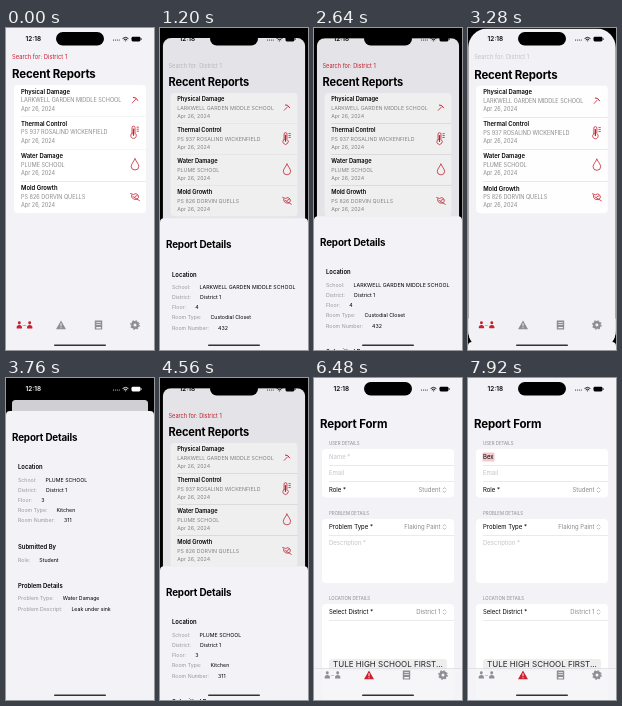
Animation of 148x322 px, one loop 8000 ms. Source, as an HTML page with a canvas:

```html
<!DOCTYPE html>
<html lang="en">
<head>
<meta charset="utf-8">
<title>Reports</title>
<style>
html, body { margin: 0; width: 148px; height: 322px; overflow: hidden; background: #000; }
canvas { display: block; width: 148px; height: 322px; }
</style>
</head>
<body>
<canvas></canvas>
<script>
const W = 148, H = 322, LOOP = 8000;
const BG = '#f2f2f7', RED = '#cc1f2f', GRAY = '#8a8a8e', PALE = '#c4c4c7', LINE = '#d6d6d9';
const canvas = document.querySelector('canvas');
const c = canvas.getContext('2d');
const ratio = window.devicePixelRatio || 1;
canvas.width = W * ratio;
canvas.height = H * ratio;

const reports = [
  ['Physical Damage', 'LARKWELL GARDEN MIDDLE SCHOOL'],
  ['Thermal Control', 'PS 937 ROSALIND WICKENFIELD'],
  ['Water Damage', 'PLUME SCHOOL'],
  ['Mold Growth', 'PS 826 DORVIN QUELLS']
];

const sheets = [
  { open: 1105, close: 2470, report: 0, floor: '4', room: 'Custodial Closet', number: '432', role: 'Parent', note: 'Door frame broken' },
  { open: 3265, close: 4390, report: 2, floor: '3', room: 'Kitchen', number: '311', role: 'Student', note: 'Leak under sink' }
];

function text(s, x, y, size, color = '#000', weight = 400, align = 'left', spacing = 0) {
  c.font = `${weight} ${size}px Inter, sans-serif`;
  c.letterSpacing = spacing + 'px';
  c.textAlign = align;
  c.textBaseline = 'middle';
  c.fillStyle = color;
  c.fillText(s, x, y);
  return c.measureText(s).width;
}

const title = (s, y, size) => text(s, 6, y, size, '#000', 700, 'left', -0.015 * size);

function box(x, y, w, h, r, color) {
  c.fillStyle = color;
  c.beginPath();
  c.roundRect(x, y, w, h, r);
  c.fill();
}

function stroke(d, x, y, color, width = 0.8) {
  c.save();
  c.translate(x, y);
  c.strokeStyle = color;
  c.lineWidth = width;
  c.lineCap = c.lineJoin = 'round';
  c.stroke(new Path2D(d));
  c.restore();
}

function fill(d, x, y, color) {
  c.save();
  c.translate(x, y);
  c.fillStyle = color;
  c.fill(new Path2D(d), 'evenodd');
  c.restore();
}

const rule = y => box(15, y, 125, 0.4, 0, LINE);

const icons = [
  y => {
    stroke('M-2.8 3L.6-.6', 129, y, RED, 0.8);
    stroke('M-1.6-2.6Q1-3.2 2.8 .4', 129, y, RED, 1);
  },
  y => {
    stroke('M-1.5 1V-4.5a1.5 1.5 0 0 1 3 0V1a2.8 2.8 0 1 1-3 0ZM3.5-5H5M3.5-3H5M3.5-1H5', 127.5, y, RED);
    stroke('M0-3V3', 127.5, y, RED, 1.3);
  },
  y => stroke('M0-5.5C1.5-2.5 3.8-.2 3.8 2A3.8 3.6 0 0 1-3.8 2C-3.8-.2-1.5-2.5 0-5.5Z', 129, y, RED),
  y => stroke('M-4.5-3Q-1-1 1-3Q4-2 3.5 1Q2 4-1.5 2.5Q-4 1-3.5-1.5M-2 0L4.5 4M0 0L2-1', 129, y, RED)
];

function tabBar(active) {
  box(0, 290.5, W, H - 290.5, 0, active ? 'rgba(245,245,248,.86)' : BG);
  if (active) box(0, 290.5, W, 0.4, 0, '#d0d0d3');
  const color = i => i === active ? RED : '#8e8e93';
  for (const x of [13.3, 23.7]) {
    box(x - 1.4, 293.2, 2.8, 3.2, 1.4, color(0));
    box(x - 2.7, 297, 5.4, 3.4, [2.7, 2.7, 0.5, 0.5], color(0));
  }
  for (const x of [16.7, 18, 19.3]) box(x, 297, 0.9, 0.9, 0.45, color(0));
  fill('M0-4.5L5 4.2H-5ZM-.5-1.8V1.3H.5V-1.8ZM-.5 2.2V3.2H.5V2.2Z', 55, 297, color(1));
  fill('M-3.7-4.5H3.7V4.5H-3.7ZM-2.2-3V-2.2H2.4V-3ZM-2.2-1V-.2H2.4V-1ZM-2.2 2V3.4H2.4V2Z', 92.5, 297, color(2));
  c.strokeStyle = color(3);
  c.lineWidth = 2.4;
  c.beginPath();
  c.arc(129, 297, 2.7, 0, 7);
  c.stroke();
  c.lineWidth = 1.2;
  c.setLineDash([1.6, 1.74]);
  c.beginPath();
  c.arc(129, 297, 4.25, 0, 2 * Math.PI);
  c.stroke();
  c.setLineDash([]);
}

function listPage(tint) {
  text('Search for: District 1', 6, 29, 5.8, tint);
  title('Recent Reports', 46.7, 11.5);
  box(8, 57, 132, 128, 4, '#fff');
  reports.forEach(([name, school], i) => {
    const y = 64 + i * 32.2;
    text(name, 15, y, 5.9, '#000', 600);
    text(school, 15, y + 8.6, 5.5, GRAY);
    text('Apr 26, 2024', 15, y + 17, 5.5, GRAY);
    icons[i](y + 8);
    if (i) rule(y - 7.5);
  });
  tabBar(0);
}

function picker(label, value, y) {
  text(label, 15, y, 6);
  text(value, 126.5, y, 6, GRAY, 400, 'right');
  stroke('M-1.4-1L0-2.4L1.4-1M-1.4 1L0 2.4L1.4 1', 130.5, y, GRAY, 0.6);
}

function formPage(t) {
  const heading = (s, y) => text(s, 15, y, 4.4, GRAY);
  title('Report Form', 46.7, 11.5);
  heading('USER DETAILS', 65.5);
  box(8, 71, 132, 48.5, 4, '#fff');
  const typed = 'Bex'.slice(0, Math.max(0, Math.floor((t - 7520) / 80) + 1));
  if (t >= 7760) box(14.5, 74.5, 12, 9, 0, '#f3c9cd');
  if (typed) {
    const w = text(typed, 15, 79, 6);
    if (t < 7760) box(15.3 + w, 75, 0.8, 8, 0, RED);
  } else {
    text('Name *', 15, 79, 6, PALE);
    if (t >= 6960) box(14.8, 75, 0.8, 8, 0, RED);
  }
  text('Email', 15, 95.5, 6, PALE);
  picker('Role *', 'Student', 112);
  rule(87);
  rule(103.5);

  heading('PROBLEM DETAILS', 136);
  box(8, 141, 132, 64, 4, '#fff');
  picker('Problem Type *', 'Flaking Paint', 149);
  rule(157);
  text('Description *', 15, 165, 6, PALE);

  heading('LOCATION DETAILS', 220.5);
  box(8, 226, 132, 100, 4, '#fff');
  picker('Select District *', 'District 1', 234);
  rule(242);
  box(15, 281, 118, 12, 3, '#eeeeef');
  text('TULE HIGH SCHOOL FIRST...', 74, 287, 8, '#222', 400, 'center');
  tabBar(1);
}

function detailSheet(s, top) {
  box(0, top, W, H, [4, 4, 0, 0], BG);
  c.save();
  c.translate(0, top);
  title('Report Details', 27, 9.8);
  const heading = (label, y) => text(label, 12, y, 5.9, '#000', 600);
  const row = (label, value, y) => {
    const w = text(label, 12, y, 5.25, '#98989d');
    text(value, 12 + w + 9, y, 5.25);
  };
  const [problem, school] = reports[s.report];
  heading('Location', 56.5);
  [['School:', school], ['District:', 'District 1'], ['Floor:', s.floor],
    ['Room Type:', s.room], ['Room Number:', s.number]]
    .forEach(([label, value], i) => row(label, value, 69 + i * 10.2));
  heading('Submitted By', 136.5);
  row('Role:', s.role, 149);
  heading('Problem Details', 175.5);
  row('Problem Type:', problem, 187.5);
  row('Problem Descript:', s.note, 198);
  c.restore();
}

function statusBar(color) {
  text('12:18', 27.3, 11, 6.4, color, 600, 'center');
  box(50, 4, 48, 13.5, 6.75, '#000');
  for (let i = 0; i < 4; i++) box(107 + i * 1.9, 11.5, 1, 1, 0.5, color);
  stroke('M-2.6-1Q0-3.2 2.6-1M-1.4.4Q0-.8 1.4.4M0 1.6V1.7', 119.5, 11.3, color, 0.9);
  box(125.5, 8.8, 9, 4.6, 1.4, color);
  box(134.9, 10.3, 0.7, 1.6, 0.3, color);
}

// Critically damped spring from 0 to 1.
function spring(ms, w) {
  const x = Math.max(0, ms) / 1000 * w;
  return 1 - (1 + x) * Math.exp(-x);
}

function draw(t) {
  const s = sheets[t < sheets[1].open ? 0 : 1];
  let p = spring(t - s.open, 16) - spring(t - s.close, 10.55);
  if (p < 0.005) p = 0;
  const presenting = t > s.open && t < s.close;

  c.setTransform(ratio, 0, 0, ratio, 0, 0);
  c.fillStyle = '#000';
  c.fillRect(0, 0, W, H);

  // The page shrinks into a dimmed, rounded card behind the sheet.
  c.save();
  const scale = 1 - 0.081 * p;
  c.translate(W / 2 * (1 - scale), 22 * p);
  c.scale(scale, scale);
  c.beginPath();
  c.roundRect(0, 0, W, H, p && 4 + 16 * (1 - p) ** 2);
  c.clip();
  c.fillStyle = BG;
  c.fillRect(0, 0, W, H);
  if (t >= 5920) formPage(t);
  else listPage(presenting ? PALE : RED);
  c.fillStyle = `rgba(0,0,0,${0.14 * p})`;
  c.fillRect(0, 0, W, H);
  c.restore();

  if (p) detailSheet(s, H - 290 * p);
  statusBar(p > 0.5 ? '#fff' : '#000');
  box(48, 316.5, 52, 1.4, 0.7, '#333');
}

const start = performance.now();
function frame() {
  draw((performance.now() - start) % LOOP);
  requestAnimationFrame(frame);
}
frame();
</script>
</body>
</html>
```
